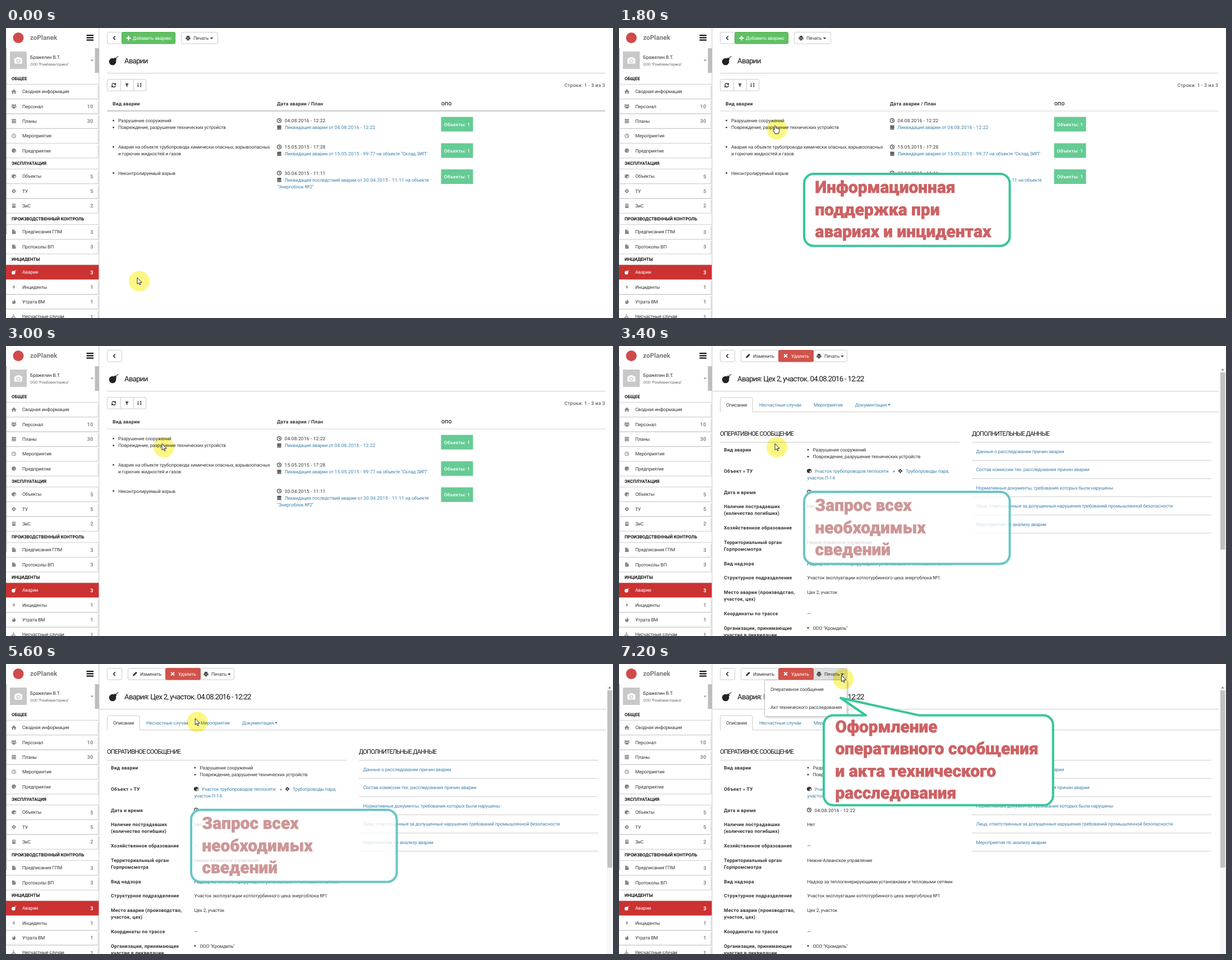
Recreate the animation shown at these times as an HTML page. Size 1082x517 px, loop 8 s.

```html
<!DOCTYPE html>
<html lang="ru">
<head>
<meta charset="utf-8">
<title>Аварии</title>
<style>
html,body{margin:0;width:100%;height:100%;overflow:hidden;background:#fff}
svg{display:block;width:1082px;height:517px}
text{font:8.4px Roboto,"Open Sans",sans-serif;letter-spacing:-.15px;fill:#333;white-space:pre;text-rendering:geometricPrecision}
.num{letter-spacing:.2px}
.link{fill:#3a80ad}
.white{fill:#fff}
.bold{font-size:8.5px;font-weight:700;letter-spacing:.25px}
.group{font-size:7.9px;font-weight:700;letter-spacing:0;fill:#111}
.count{font-size:9.2px;font-weight:700;letter-spacing:0;fill:#888;text-anchor:end}
.count.white{fill:#fff}
.small{font-size:6.6px;fill:#666}
.brand{font-size:11.6px;font-weight:700;letter-spacing:0;fill:#777}
.title{font-size:13.2px;letter-spacing:-.72px;fill:#111}
.section{font-size:11px;letter-spacing:-.8px;fill:#111}
.title .num{letter-spacing:-.72px}
.end{text-anchor:end;letter-spacing:.35px}
.mid{text-anchor:middle;letter-spacing:.15px;font-weight:500}
.box{fill:#fff;stroke:#ccc}
.callout path{fill:#fff;stroke:#35c799;stroke-width:4;stroke-linejoin:round}
.callout text{font-size:29.9px;font-weight:900;letter-spacing:0;fill:#cd6163;stroke:#cd6163;stroke-width:.6}
.half path{stroke:#68c6c6;fill-opacity:.78}
.half text{fill:#cd9797;stroke:#cd9797}
.halo{fill:#fcf785;mix-blend-mode:multiply}
</style>
</head>
<body>
<svg viewBox="0 0 1082 517" xmlns="http://www.w3.org/2000/svg"></svg>
<script>
const disc = (x, y, r, sweep = 1) =>
  `M${x - r} ${y}a${r} ${r} 0 1 ${sweep} ${2 * r} 0a${r} ${r} 0 1 ${sweep} ${-2 * r} 0z`;

const ICONS = {
  home: 'M-4.8 .3 0-4.5 4.8 .3H3.4V4H1V1H-1V4H-3.4V.3z',
  people: disc(0, -1.8, 1.8) + disc(-3, -2.4, 1.4) + disc(3, -2.4, 1.4) + 'M-2.6 4V1.4Q0-.8 2.6 1.4V4zM-4.6 2V-.4H-2.4V2zM2.4 2V-.4H4.6V2z',
  plan: 'M-4-4H4V-2H-4zM-4-1.4H4V0H-4zM-4 .6H4V2H-4zM-4 2.6H4V4H-4z',
  clock: disc(0, 0, 4) + disc(0, 0, 2.9, 0) + 'M-.5-2.2H.5V0H2V1H-.5z',
  globe: disc(0, 0, 4) + 'M-2.5-1 0-2.8 .4 0-1.2 1zM1 2.8 2.8 1 1 .4z',
  cube: 'M0-4 4-2.2V2.2L0 4-4 2.2V-2.2zM.6 .4V2.9L3.1 1.7V-.8z',
  gear: disc(0, 0, 3) + disc(0, 0, 1.3, 0) + 'M-.8-4H.8V-2.6H-.8zM-.8 2.6H.8V4H-.8zM-4-.8H-2.6V.8H-4zM2.6-.8H4V.8H2.6z',
  building: 'M-3-4H3V4H-3zM-1.8-3V-1.6H-.4V-3zM.5-3V-1.6H1.9V-3zM-1.8-.8V.6H-.4V-.8zM.5-.8V.6H1.9V-.8z',
  file: 'M-3.3-4H.7V-1.2H3.5V4H-3.3zM1.4-4 3.5-2H1.4z',
  bomb: disc(-.8, .8, 3.4) + 'M.6-2.4 1.6-3.2 3.2-1.6 2.4-.6zM2.4-2.9 3.5-4 4-3.5 2.9-2.4zM3.8-4.6 4.8-4.4 4.5-3.4z',
  bolt: 'M1-4.5-2.5 .6H-.2L-1 4.5 2.5-1H.3z',
  fire: 'M0-4.5C3-1.5 4-.5 3 2 2 5-2 5-3 2-3.6 .5-2.2-.6-2-2-1-1.6-.8-.8-.7 0 .5-1 .4-2.6 0-4.5z',
  chair: disc(-1, -3.6, 1) + 'M-1.6-2.2H-.4V-.8H2V.2H-.4V1H2.4L4 3.8 3 4.2 1.8 2H-1.6zM-2.2-.4-2.2 .8A2 2 0 1 0 1 3.2L1.8 3.6A3.2 3.2 0 1 1-2.2-.4z',
  camera: 'M-7-4H-4L-2.6-6H2.6L4-4H7V5.5H-7z' + disc(0, .7, 3.4, 0) + disc(0, .7, 2.1),
  back: 'M1.2-4 2.4-2.9-.4 0 2.4 2.9 1.2 4-2.7 0z',
  plus: 'M-1.1-4H1.1V-1.1H4V1.1H1.1V4H-1.1V1.1H-4V-1.1H-1.1z',
  print: 'M-2.5-4H2.5V-1.8H-2.5zM-4-1.2H4V2.2H2.6V.8H-2.6V2.2H-4zM-2 1.5H2V4H-2z',
  caret: 'M-2.8-1.4H2.8L0 1.6z',
  reload: 'M-4-.4A4 4 0 0 1 2.7-3L4-4.2V-.6H.4L1.7-1.9A2.6 2.6 0 0 0-2.6-.4zM4 .4A4 4 0 0 1-2.7 3L-4 4.2V.6H-.4L-1.7 1.9A2.6 2.6 0 0 0 2.6 .4z',
  filter: 'M-3.8-3.5H3.8L1-.3V4L-1 2.6V-.3z',
  sort: 'M-3.4-4H-2.2V2H-.8L-2.8 4.3-4.8 2H-3.4zM1-4H3.6V-.6H1zM1.8-3.2V-1.4H2.8V-3.2zM1 .6H3.8V1.6L2.2 3.2H3.8V4.2H1V3.2L2.6 1.6H1z',
  pencil: 'M-4 4-3.4 1.4 1.8-3.8 3.8-1.8-1.4 3.4z',
  cross: 'M-3.5-2.2-2.2-3.5 0-1.3 2.2-3.5 3.5-2.2 1.3 0 3.5 2.2 2.2 3.5 0 1.3-2.2 3.5-3.5 2.2-1.3 0z'
};

const text = (x, y, s, cls = '') =>
  `<text x="${x}" y="${y + 3}" class="${cls}">${s.replace(/\d[\d.:]+( - [\d:]+)?/g, '<tspan class="num">$&</tspan>')}</text>`;
const icon = (name, x, y, fill = '#333', k = 1) =>
  `<path d="${ICONS[name]}" fill="${fill}" transform="translate(${x} ${y}) scale(${k})"/>`;
const rect = (x, y, w, h, fill, extra = '') =>
  `<rect x="${x}" y="${y}" width="${w}" height="${h}" fill="${fill}" ${extra}/>`;
const button = (x, w, fill = '#fff', stroke = '#ccc', y = 7.5, id = '') =>
  rect(x + .5, y, w, 20.5, fill, `stroke="${stroke}" rx="2" ${id}`);
const rule = (x1, x2, y, color = '#ccc') => rect(x1, y, x2 - x1, 1, color);
const group = (id, body) => `<g id="${id}">${body}</g>`;
const bullet = (x, y, s) => `<circle cx="${x - 8.5}" cy="${y}" r="1.4" fill="#333"/>` + text(x, y, s);

function sidebar() {
  const menu = [
    [90, 'ОБЩЕЕ', [['home', 'Сводная информация'], ['people', 'Персонал', 10], ['plan', 'Планы', 30], ['clock', 'Мероприятия'], ['globe', 'Предприятие']]],
    [241, 'ЭКСПЛУАТАЦИЯ', [['cube', 'Объекты', 5], ['gear', 'ТУ', 5], ['building', 'ЗиС', 2]]],
    [340, 'ПРОИЗВОДСТВЕННЫЙ КОНТРОЛЬ', [['file', 'Предписания ГПМ', 3], ['file', 'Протоколы ВП', 3]]],
    [412, 'ИНЦИДЕНТЫ', [['bomb', 'Аварии', 3], ['bolt', 'Инциденты', 1], ['fire', 'Утрата ВМ', 1], ['chair', 'Несчастные случаи', 1]]]
  ];
  let out = rect(165.3, 0, 1, 517, '#c6c6c6') + rect(0, 36, 1.6, 332, '#c4c4c4') +
    rect(158.5, 36, 7.5, 44, '#bdbdbd') +
    '<circle cx="22" cy="17.5" r="9.5" fill="#d04a4a"/>' + text(43, 18, 'zoPlanek', 'brand') +
    [12, 16.2, 20.4].map(y => rect(143.5, y, 12.5, 2.2, '#111')).join('') +
    rect(7, 42, 30, 31, '#c8c8c8') + icon('camera', 22, 58, '#fff') +
    text(43, 52, 'Бражелин В.Т.') + text(43, 64.3, 'ООО "Ромбовекторика"', 'small') +
    icon('caret', 153.5, 58, '#999');
  for (const [y, name, items] of menu) {
    out += text(10, y - .2, name, 'group');
    items.forEach(([ic, label, n], i) => {
      const c = y + 23.4 + i * 26.3, on = label === 'Аварии', cls = on ? 'white' : '';
      out += rule(0, 165, c - 13.6) + rule(0, 165, c + 12.7) + rect(163.5, c - 10, 1, 22, '#ccc');
      if (on) out += rect(0, c - 13, 165.3, 26, '#cb3232');
      out += icon(ic, 14, c, on ? '#fff' : '#858585', .95) + text(29, c, label, cls);
      if (n) out += text(155.5, c + .4, '' + n, 'count ' + cls);
    });
  }
  return out;
}

function listPage() {
  const rows = [
    [165, ['Разрушение сооружений', 'Повреждение, разрушение технических устройств'], '04.08.2016 - 12:22', 'Ликвидация аварии от 04.08.2016 - 12:22'],
    [212, ['Авария на объекте трубопровода химически опасных, взрывоопасных'], '15.05.2015 - 17:28', 'Ликвидация аварии от 15.05.2015 - 99:77 на объекте "Склад ЗИП"'],
    [258.5, ['Неконтролируемый взрыв'], '30.04.2015 - 11:11', 'Ликвидация последствий аварии от 30.04.2015 - 11:11 на объекте']
  ];
  return group('listTools',
      button(206, 95, '#61c065', '#4cae4c') + icon('plus', 218.5, 18, '#fff') + text(226, 18, 'Добавить аварию', 'white') +
      button(312, 65) + icon('print', 324.5, 18) + text(334, 18, 'Печать') + icon('caret', 366.5, 18.5)) +
    text(211, 60, 'Аварии', 'title') + rule(180, 1068, 80) +
    button(180, 69, '#fff', '#ccc', 91.5) + rect(204, 92, 1, 20, '#ccc') + rect(227, 92, 1, 20, '#ccc') +
    icon('reload', 192, 102) + icon('filter', 215.5, 102, '#333', .85) + icon('sort', 238, 101.5, '#333', .9) +
    text(1068, 102, 'Строки: 1 - 3 из 3', 'end') +
    text(190, 135, 'Вид аварии', 'bold') + text(483, 135, 'Дата аварии / План', 'bold') + text(776, 135, 'ОПО', 'bold') +
    rule(180, 1068, 147.5, '#d4d4d4') + group('thickRule', rect(180, 146.5, 888, 2.5, '#cfcfcf')) +
    rows.map(([y, kinds, date, link]) =>
      kinds.map((s, i) => bullet(200, y + i * 12.3, s)).join('') +
      icon('clock', 487, y) + text(496.5, y, date) +
      icon('plan', 487, y + 12.3, '#333', .9) + text(496.5, y + 12.3, link, 'link') +
      rect(775.5, y - 6.5, 57, 26, '#66cb94') + text(804, y + 6.7, 'Объекты: 1', 'white mid')).join('') +
    text(200, 224.3, 'и горючих жидкостей и газов') + text(483, 282.8, '"Энергоблок №2"', 'link');
}

function detailPage() {
  const fields = [
    [185, 'Вид аварии'], [222.5, 'Объект » ТУ'], [260.5, 'Дата и время'],
    [286, 'Наличие пострадавших|(количество погибших)', 'Нет'],
    [324, 'Хозяйственное образование', '—'],
    [350, 'Территориальный орган|Горпромсмотра', 'Нижне-Алванское управление'],
    [387.5, 'Вид надзора', 'Надзор за теплогенерирующими установками и тепловыми сетями'],
    [413, 'Структурное подразделение', 'Участок эксплуатации котлотурбинного цеха энергоблока №1'],
    [439, 'Место аварии (производство,|участок, цех)', 'Цех 2, участок'],
    [477, 'Координаты по трассе', '—'],
    [502.5, 'Организации, принимающие|участие в ликвидации']
  ];
  const extras = ['Данные о расследовании причин аварии', 'Состав комиссии тех. расследования причин аварии',
    'Нормативные документы, требования которых были нарушены',
    'Лица, ответственные за допущенные нарушения требований промышленной безопасности', 'Мероприятия по анализу аварии'];
  return button(217, 68) + icon('pencil', 230, 17.5) + text(239, 18, 'Изменить') +
    button(346, 60, '#fff', '#ccc', 7.5, 'id="printButton"') +
    button(284, 62, '#d0534b', '#cb4b44') + icon('cross', 297, 17.5, '#fff') + text(307, 18, 'Удалить', 'white') +
    icon('print', 356.5, 18) + text(366, 18, 'Печать') + icon('caret', 398, 18.5) +
    text(211, 60, 'Авария: Цех 2, участок. 04.08.2016 - 12:22', 'title') + rule(167, 1070, 80) +
    rule(180, 1070, 117) + '<path d="M180.5 118V95q0-3 3-3H235q3 0 3 3V118" class="box"/>' +
    text(191, 104.5, 'Описание') + text(250, 104.5, 'Несчастные случаи', 'link') +
    text(347, 104.5, 'Мероприятия', 'link') + text(421, 104.5, 'Документация', 'link') + icon('caret', 481.5, 105, '#3a80ad') +
    text(180, 157, 'ОПЕРАТИВНОЕ СООБЩЕНИЕ', 'section') + text(629, 157, 'ДОПОЛНИТЕЛЬНЫЕ ДАННЫЕ', 'section') +
    rule(180, 607, 171) + rule(629, 1056, 171) +
    fields.map(([y, label, value]) =>
      label.split('|').map((s, i) => text(187, y + i * 12.2, s, 'bold')).join('') +
      (value ? text(335.5, y, value) : '')).join('') +
    bullet(345.5, 185, 'Разрушение сооружений') + bullet(345.5, 197.2, 'Повреждение, разрушение технических устройств') +
    icon('cube', 339, 222.8) + text(348.5, 222.5, 'Участок трубопроводов теплосети', 'link') + text(488, 222.5, '»') +
    icon('gear', 501.5, 222.8, '#333', .9) + text(511, 222.5, 'Трубопроводы пара,', 'link') + text(335.5, 234.8, 'участок П-14', 'link') +
    icon('clock', 339, 260.3) + text(348.5, 260.5, '04.08.2016 - 12:22') + bullet(345.5, 502.5, 'ООО "Кромдель"') +
    extras.map((s, i) => text(636.5, 188 + i * 32.4, s, 'link') + rule(629, 1056, 203.5 + i * 32.4)).join('') +
    rect(1071, 39, 11, 478, '#f7f7f7') + rect(1072, 47, 8.5, 316, '#c1c1c1') +
    '<path d="M1073.5 43.5h5l-2.5-3z" fill="#777"/>';
}

const callout = (id, outline, x, y, lines) => `<g id="${id}" class="callout"><path d="${outline}"/>` +
  lines.map((s, i) => text(x, y + i * 39.4, s)).join('') + '</g>';
const bubble = (x, y, w, h, tail = '') => {
  const r = 17, corner = (dx, dy) => `a${r} ${r} 0 0 1 ${dx * r} ${dy * r}`;
  return `M${x + r} ${y}${tail}H${x + w - r}${corner(1, 1)}V${y + h - r}${corner(-1, 1)}H${x + r}${corner(-1, -1)}V${y + r}${corner(1, -1)}z`;
};

document.querySelector('svg').innerHTML =
  rect(0, 0, 1082, 517, '#fff') + sidebar() +
  button(180, 26) + icon('back', 193, 17.7) + icon('bomb', 191.5, 58.5, '#222', 1.85) +
  group('list', listPage()) + group('detail', detailPage()) +
  group('menu', rect(261, 30, 149, 67, '#000', 'opacity=".1" rx="3"') + rect(259.5, 28.5, 147, 65, '#fff', 'stroke="#bbb" rx="2"') +
    text(270, 45, 'Оперативное сообщение') + text(270, 77.3, 'Акт технического расследования')) +
  callout('info', bubble(330, 260, 366.5, 128.5), 349.5, 291.3, ['Информационная', 'поддержка при', 'авариях и инцидентах']) +
  callout('request', bubble(330, 260, 366.5, 128.5), 349.5, 291.3, ['Запрос всех', 'необходимых', 'сведений']) +
  callout('report', bubble(365, 91.5, 408.7, 160.3, 'H440L395 60.5 535 91.5'), 385.5, 118.8,
    ['Оформление', 'оперативного сообщения', 'и акта технического', 'расследования']) +
  group('cursor', '<circle r="18.5" class="halo"/>' +
    '<circle id="ring" cx="-2.5" cy="-7.5" r="6" fill="none" stroke="#f58a1f" stroke-width="3"/>' +
    '<g transform="translate(-3.5 -6.5)" fill="#fff" stroke="#111" stroke-width=".9" stroke-linejoin="round">' +
    '<path id="arrow" d="M0 0V11.5L2.6 9.2 4.4 13 6 12.2 4.3 8.6H8z"/>' +
    '<path id="hand" d="M-1 1V7.5L-2.6 6.5Q-4.2 7-3.2 8.5L.3 14.5H6.2L7.6 10V6Q6.7 4.9 5.7 5.5 4.7 4.4 3.7 5 2.7 4.3 1.7 4.8V1Q.3-.8-1 1z"/></g>');

const LOOP = 8000, STEP = 200;
const el = id => document.getElementById(id);
const show = (id, on) => { el(id).style.display = on ? '' : 'none'; };

// fade in at half, full, half again, gone
const CALLOUTS = {
  info: [200, 400, 2400, 2600],
  request: [3400, 3600, 5600, 5800],
  report: [7000, 7200, LOOP, LOOP]
};
// start, end, from, to
const MOVES = [
  [600, 1800, [237.5, 451.5], [281.5, 180.5]],
  [5000, 6200, [281.5, 180.5], [400, 26.5]]
];
const ease = p => p < .5 ? (2 * p) ** 2.2 / 2 : 1 - (2 - 2 * p) ** 2.2 / 2;

function draw(now) {
  const t = Math.floor(now % LOOP / STEP) * STEP;
  const within = (a, b) => t >= a && t < b;

  show('list', t < 3200);
  show('listTools', t < 3000);
  show('thickRule', t < 1200);
  show('detail', t >= 3200);
  show('menu', t >= 6800);
  el('printButton').setAttribute('fill', t >= 6400 ? '#dedede' : '#fff');

  for (const [id, [start, full, fade, end]] of Object.entries(CALLOUTS)) {
    show(id, within(start, end));
    el(id).classList.toggle('half', !within(full, fade));
  }

  const [a, b, from, to] = MOVES[t < MOVES[1][0] ? 0 : 1];
  const k = ease(Math.min(1, Math.max(0, (t - a) / (b - a))));
  const [x, y] = from.map((v, i) => v + (to[i] - v) * k);
  el('cursor').setAttribute('transform', `translate(${x} ${y})`);
  const pointing = within(1400, 3000) || within(6200, 6800);
  show('hand', pointing);
  show('arrow', !pointing);
  show('ring', within(2800, 3000) || within(6600, 6800));
}

const origin = performance.now();
(function tick() {
  draw(performance.now() - origin);
  requestAnimationFrame(tick);
})();
</script>
</body>
</html>
```
